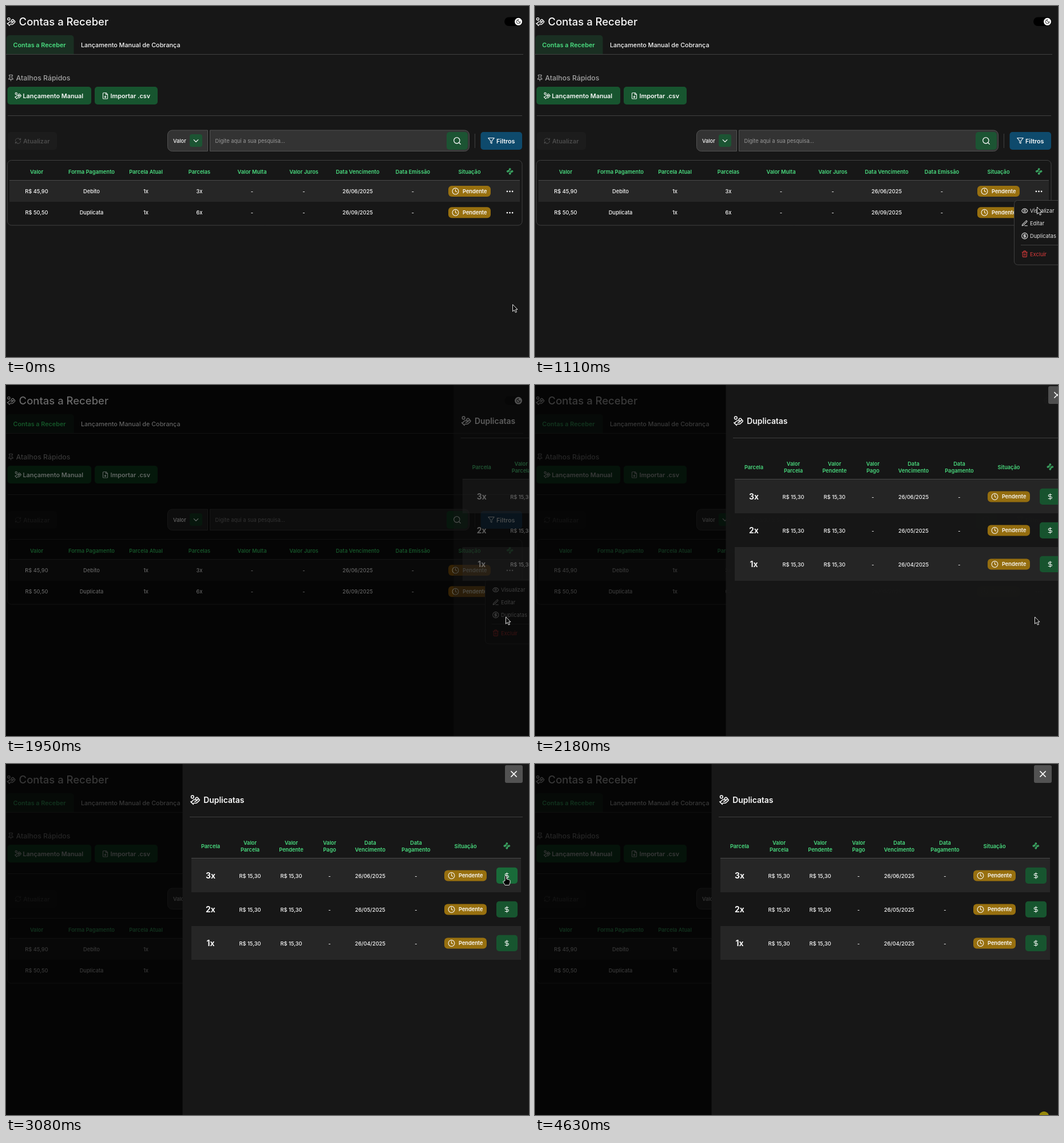
Recreate the animation shown at these times as an HTML page with a canvas. Size 914x613 px, loop 4.72 s.

```html
<!DOCTYPE html>
<html lang="pt-BR">
<head>
<meta charset="utf-8">
<title>Contas a Receber</title>
<style>
html, body { margin: 0; width: 100%; height: 100%; overflow: hidden; background: #171717; }
canvas { display: block; width: 914px; height: 613px; }
</style>
</head>
<body>
<canvas id="stage" width="914" height="613"></canvas>
<script>
const W = 914, H = 613, LOOP = 4720;
const canvas = document.getElementById('stage');
const ctx = canvas.getContext('2d');

const BG = '#171717', LINE = '#404040', ROW = '#262626', WHITE = '#fafafa';
const GREEN = '#4ade80', BUTTON = '#17552f', HOVER = '#196b39', RED = '#dc3b3b';
const SMALL = 9.24, BASE = 10.8, MEDIUM = 12.32, LARGE = 13.86, TITLE = 18.48;

// Icons on a 24 x 24 grid
const ring = (x, y, r) => `M${x - r} ${y}a${r} ${r} 0 1 0 ${2 * r} 0a${r} ${r} 0 1 0 ${-2 * r} 0`;
const icons = {
  coins: 'M11 15h2a2 2 0 1 0 0-4h-3c-.6 0-1.1.2-1.4.6L3 17M7 21l1.6-1.4c.3-.4.8-.6 1.4-.6h4c1.1 0 2.1-.4 2.8-1.2l4.6-4.4a2 2 0 0 0-2.75-2.91l-4.2 3.9M2 16l6 6' + ring(16, 9, 2.9) + ring(6, 5, 3),
  pin: 'M12 17v5M9 11q0 1-1 1.5l-2 1q-1 .6-1 2V17h14v-1.5q0-1.4-1-2l-2-1q-1-.5-1-1.5V6h1a2 2 0 0 0 0-4H8a2 2 0 0 0 0 4h1z',
  file: 'M15 2H6a2 2 0 0 0-2 2v16a2 2 0 0 0 2 2h12a2 2 0 0 0 2-2V7zM14 2v6h6M12 18v-6M9 15l3 3 3-3',
  refresh: 'M3 12a9 9 0 0 1 9-9 9.75 9.75 0 0 1 6.74 2.74L21 8M21 3v5h-5M21 12a9 9 0 0 1-9 9 9.75 9.75 0 0 1-6.74-2.74L3 16M8 16H3v5',
  chevron: 'M6 9l6 6 6-6',
  search: 'M21 21l-4.3-4.3' + ring(11, 11, 8),
  filter: 'M22 3H2l8 9.46V19l4 2v-8.54z',
  clock: 'M12 6v6l4 2' + ring(12, 12, 10),
  nodes: 'M10.2 6.3l-3.9 3.9M7 12h10M13.8 17.7l3.9-3.9' + ring(12, 4.5, 2.5) + ring(4.5, 12, 2.5) + ring(19.5, 12, 2.5) + ring(12, 19.5, 2.5),
  moon: 'M12 3a6 6 0 0 0 9 9 9 9 0 1 1-9-9z',
  eye: 'M2 12s3-7 10-7 10 7 10 7-3 7-10 7-10-7-10-7z' + ring(12, 12, 3),
  pen: 'M12 20h9M16.5 3.5a2.1 2.1 0 0 1 3 3L7 19l-4 1 1-4z',
  coin: 'M16 8h-6a2 2 0 1 0 0 4h4a2 2 0 1 1 0 4H8M12 18V6' + ring(12, 12, 10),
  trash: 'M3 6h18M19 6v14a2 2 0 0 1-2 2H7a2 2 0 0 1-2-2V6M8 6V4a2 2 0 0 1 2-2h4a2 2 0 0 1 2 2v2M10 11v6M14 11v6',
  dollar: 'M12 2v20M17 5H9.5a3.5 3.5 0 0 0 0 7h5a3.5 3.5 0 0 1 0 7H6',
  close: 'M18 6L6 18M6 6l12 12'
};
for (const name in icons) icons[name] = new Path2D(icons[name]);

const arrow = new Path2D('M0 0V12.2L2.8 9.6 4.9 14 6.9 13.1 4.9 8.8H8.5z');
const hand = new Path2D('M-1.5 9V1.5a1.5 1.5 0 0 1 3 0V6l4.500 1.2q1.5.5 1.5 2V12L6 16.5H-1.5L-4.6 11q-.5-1.5 1-1.5z');

function icon(name, cx, cy, size, color, weight = 2) {
  ctx.save();
  ctx.translate(cx - size / 2, cy - size / 2);
  ctx.scale(size / 24, size / 24);
  ctx.lineWidth = weight;
  ctx.lineCap = ctx.lineJoin = 'round';
  ctx.strokeStyle = color;
  ctx.stroke(icons[name]);
  ctx.restore();
}

// y is the middle of the capitals
function text(s, x, y, size, color, weight = 500, align = 'left') {
  ctx.font = `${weight} ${size}px Inter, sans-serif`;
  ctx.textAlign = align;
  ctx.fillStyle = color;
  ctx.fillText(s, x, y + size * 0.36);
}
const center = (s, x, y, color = WHITE, weight = 500, size = SMALL) => text(s, x, y, size, color, weight, 'center');

function box(x, y, w, h, r, fill, border) {
  ctx.beginPath();
  ctx.roundRect(x, y, w, h, r);
  if (fill) { ctx.fillStyle = fill; ctx.fill(); }
  if (border) { ctx.strokeStyle = border; ctx.lineWidth = 1; ctx.stroke(); }
}
function rect(x, y, w, h, color) {
  ctx.fillStyle = color;
  ctx.fillRect(x, y, w, h);
}
function disc(x, y, r, color) {
  ctx.beginPath();
  ctx.arc(x, y, r, 0, 7);
  ctx.fillStyle = color;
  ctx.fill();
}
function badge(x, y) {
  box(x - 37, y - 9.5, 74, 19, 6, '#98700f');
  icon('clock', x - 24.5, y, 13, WHITE);
  text('Pendente', x - 12, y, SMALL, WHITE, 600);
}

const clamp = v => Math.min(1, Math.max(0, v));

// Cubic Bézier (0.4, 0, 0.2, 1)
function ease(x) {
  let lo = 0, hi = 1;
  for (let i = 0; i < 20; i++) {
    const s = (lo + hi) / 2, q = 1 - s;
    if (1.2 * q * q * s + 0.6 * q * s * s + s * s * s < x) lo = s; else hi = s;
  }
  return lo * lo * (3 - 2 * lo);
}

// Pointer path: time, x, y
const path = [
  [0, 885.5, 521.5], [130, 890, 490], [290, 904, 400], [430, 896, 340], [560, 889, 327],
  [700, 880, 325], [920, 880, 326], [1110, 877.5, 351], [1310, 876, 374], [1590, 873.5, 405],
  [2240, 873.5, 405], [2350, 800, 345], [2490, 640, 262], [2560, 614, 232], [2630, 650, 212],
  [2770, 819, 225], [2910, 873.5, 195], [3350, 873.5, 195], [3490, 875, 330], [3630, 878, 540],
  [3700, 878, 553], [3910, 873.5, 249], [4090, 880, 450], [4300, 889.5, 615.5], [LOOP, 889.5, 615.5]
];
function pointer(t) {
  let i = 1;
  while (path[i][0] < t) i++;
  const [t0, x0, y0] = path[i - 1], [t1, x1, y1] = path[i];
  const k = (t - t0) / (t1 - t0);
  return { x: x0 + (x1 - x0) * k, y: y0 + (y1 - y0) * k };
}

const columns = [
  ['Valor', 53.5], ['Forma Pagamento', 149.5], ['Parcela Atual', 244.5], ['Parcelas', 338],
  ['Valor Multa', 430], ['Valor Juros', 520.5], ['Data Vencimento', 614.5],
  ['Data Emissão', 711], ['Situação', 810]
];
const bills = [
  ['R$ 45,90', 'Debito', '1x', '3x', '-', '-', '26/06/2025', '-'],
  ['R$ 50,50', 'Duplicata', '1x', '6x', '-', '-', '26/09/2025', '-']
];

function page(t) {
  rect(0, 0, W, H, BG);

  icon('coins', 9, 27.5, 16.5, WHITE);
  text('Contas a Receber', 22.6, 27.5, TITLE, WHITE);
  box(871, 19.5, 32, 15.5, 8, '#000');
  disc(895.5, 27.3, 6.5, '#fff');
  icon('moon', 895.5, 27.3, 9, '#171717', 2.4);

  box(1, 51, 117.5, 33.5, [5, 5, 0, 0], '#1a2f22');
  text('Contas a Receber', 12.5, 68.5, BASE, GREEN, 600);
  text('Lançamento Manual de Cobrança', 131, 68.5, BASE, WHITE);
  rect(0, 84, 904, 1, LINE);

  icon('pin', 8.5, 125.5, 12.5, '#a3a3a3');
  text('Atalhos Rápidos', 17.5, 126, MEDIUM, '#a3a3a3');
  box(2.5, 141, 146.5, 31, 5, BUTTON);
  icon('coins', 21, 156.7, 13, WHITE);
  text('Lançamento Manual', 29.5, 157.5, BASE, WHITE, 600);
  box(155, 141, 110, 31, 5, BUTTON);
  icon('file', 173.5, 156.8, 12.3, WHITE);
  text('Importar .csv', 182.5, 157.5, BASE, WHITE, 600);
  rect(3, 191, 899, 1, LINE);

  box(3, 220, 86, 31, 5, '#1c1c1c');
  icon('refresh', 21, 235.5, 12.3, '#4b4b4b');
  text('Atualizar', 30, 236, BASE, '#4b4b4b', 600);

  box(282.5, 217, 70, 36.5, [8, 0, 0, 8], '#333333', '#525252');
  text('Valor', 292, 236, SMALL, WHITE);
  box(321, 224, 22, 22, 4, '#1c5433');
  icon('chevron', 332, 235.5, 15, WHITE);
  box(356.5, 217, 453, 36.5, [0, 8, 8, 0], '#333333', '#525252');
  text('Digite aqui a sua pesquisa...', 365.5, 236, SMALL, '#999', 400);
  box(770, 220, 37, 31, 5, '#1c5433');
  icon('search', 788.5, 235.5, 15.4, WHITE);
  rect(819, 223, 1, 25, LINE);
  box(829.5, 220, 72.5, 31, 5, '#0e4a6c');
  icon('filter', 848, 235.3, 12.6, WHITE);
  text('Filtros', 857, 236, BASE, WHITE, 600);

  box(2.5, 269.5, 899.5, 113.5, 7, null, LINE);
  columns.forEach(([name, x]) => center(name, x, 289.5, GREEN, 600));
  icon('nodes', 880.7, 288.8, 12.3, GREEN);
  rect(6, 304, 892, 1, '#4a4a4a');
  rect(6, 305, 892, 37, ROW);
  if (t >= 430 && t < 920) box(870, 313, 21, 20, 4, '#404040');
  bills.forEach((bill, i) => {
    const y = 323.5 + i * 37.3;
    bill.forEach((s, j) => center(s, columns[j][1], y));
    badge(810, y);
    for (let d = -1; d < 2; d++) disc(880.5 + d * 4.6, y + 0.3, 1.35, WHITE);
  });
}

function menu(t, at) {
  if (t < 900 || t > 2110) return;
  const k = clamp((t - 900) / 150), s = 0.95 + 0.05 * k;
  ctx.save();
  ctx.globalAlpha = k;
  ctx.translate(880, 339);
  ctx.scale(s, s);
  ctx.translate(-880, -339);
  box(837.5, 339.5, 120, 112.5, 6, BG, LINE);
  const items = [['eye', 'Visualizar'], ['pen', 'Editar'], ['coin', 'Duplicatas']];
  items.forEach(([name, label], i) => {
    const y = 358 + i * 21.9;
    const on = t < 1950 && at.y > y - 6 && at.y <= y + 11;
    const color = on ? '#22c55e' : '#e5e5e5';
    icon(name, 855.8, y - 0.3, 12.3, color);
    text(label, 865, y, SMALL, color, 400);
  });
  rect(849, 417, 65, 1, LINE);
  icon('trash', 855.8, 433, 12.3, RED);
  text('Excluir', 865, 433.5, SMALL, RED, 400);
  ctx.restore();
}

const heads = [
  ['Parcela', '', 357.5], ['Valor', 'Parcela', 426.5], ['Valor', 'Pendente', 498.5],
  ['Valor', 'Pago', 565.5], ['Data', 'Vencimento', 636.5], ['Data', 'Pagamento', 716.5],
  ['Situação', '', 803]
];
const onButton = (at, y) => at.x >= 857 && at.x <= 894 && Math.abs(at.y - y) <= 14;

function drawer(p, at) {
  ctx.save();
  ctx.globalAlpha = Math.pow(p, 0.7);
  ctx.translate(605 * (1 - p), 0);
  rect(308.5, 0, 605.5, H, BG);
  box(872, 2, 31, 31, 3, '#525252');
  icon('close', 887.5, 17.5, 18.5, WHITE);
  icon('coins', 330.5, 62.8, 18.5, WHITE);
  text('Duplicatas', 345.3, 63.5, LARGE, WHITE, 600);
  rect(321, 92, 582, 1, LINE);
  for (const [a, b, x] of heads) {
    center(a, x, b ? 137.5 : 143.5, GREEN, 600);
    if (b) center(b, x, 149.8, GREEN, 600);
  }
  icon('nodes', 875.3, 143, 12.3, GREEN);
  for (let i = 0; i < 3; i++) {
    const y = 195 + i * 59;
    if (i != 1) rect(324, y - 30, 576, 59, ROW);
    const cells = ['', 'R$ 15,30', 'R$ 15,30', '-', `26/0${6 - i}/2025`, '-'];
    center(`${3 - i}x`, 357.5, y + 0.5, WHITE, 700, LARGE);
    cells.forEach((s, j) => center(s, heads[j][2], y + 0.5));
    badge(803, y);
    box(857, y - 14.3, 37, 28.3, 5, p > 0.9 && onButton(at, y) ? HOVER : BUTTON);
    icon('dollar', 875.3, y, 12.3, WHITE);
  }
  rect(324, 164, 576, 1, '#4a4a4a');
  ctx.restore();
}

// Contrast rises while the page dims under the panel
function dim(p) {
  ctx.save();
  ctx.globalCompositeOperation = 'multiply';
  ctx.globalAlpha = 0.7 * (1 - p);
  ctx.drawImage(canvas, 0, 0);
  ctx.restore();
  rect(0, 0, W, H, `rgba(0,0,0,${0.78 * Math.pow(p, 0.22)})`);
}

const clicks = [[850, 920], [1740, 1880], [4630, LOOP]];

function cursor(t, at) {
  if (clicks.some(([a, b]) => t >= a && t < b)) disc(at.x, at.y, 8.7, 'rgba(255,230,0,.55)');
  const overButton = t > 2700 && [195, 254, 313].some(y => onButton(at, y));
  ctx.save();
  ctx.translate(at.x, at.y);
  ctx.lineWidth = 0.9;
  ctx.lineJoin = 'round';
  ctx.fillStyle = '#000';
  ctx.strokeStyle = '#fff';
  const shape = overButton ? hand : arrow;
  ctx.fill(shape);
  ctx.stroke(shape);
  ctx.restore();
}

function draw(t) {
  const at = pointer(t);
  page(t);
  menu(t, at);
  if (t >= 1950) {
    const p = ease(clamp((t - 1841.3) / 454));
    dim(p);
    drawer(p, at);
  }
  cursor(t, at);
}

const start = performance.now();
function tick() {
  draw((performance.now() - start) % LOOP);
  requestAnimationFrame(tick);
}
tick();
</script>
</body>
</html>
```
